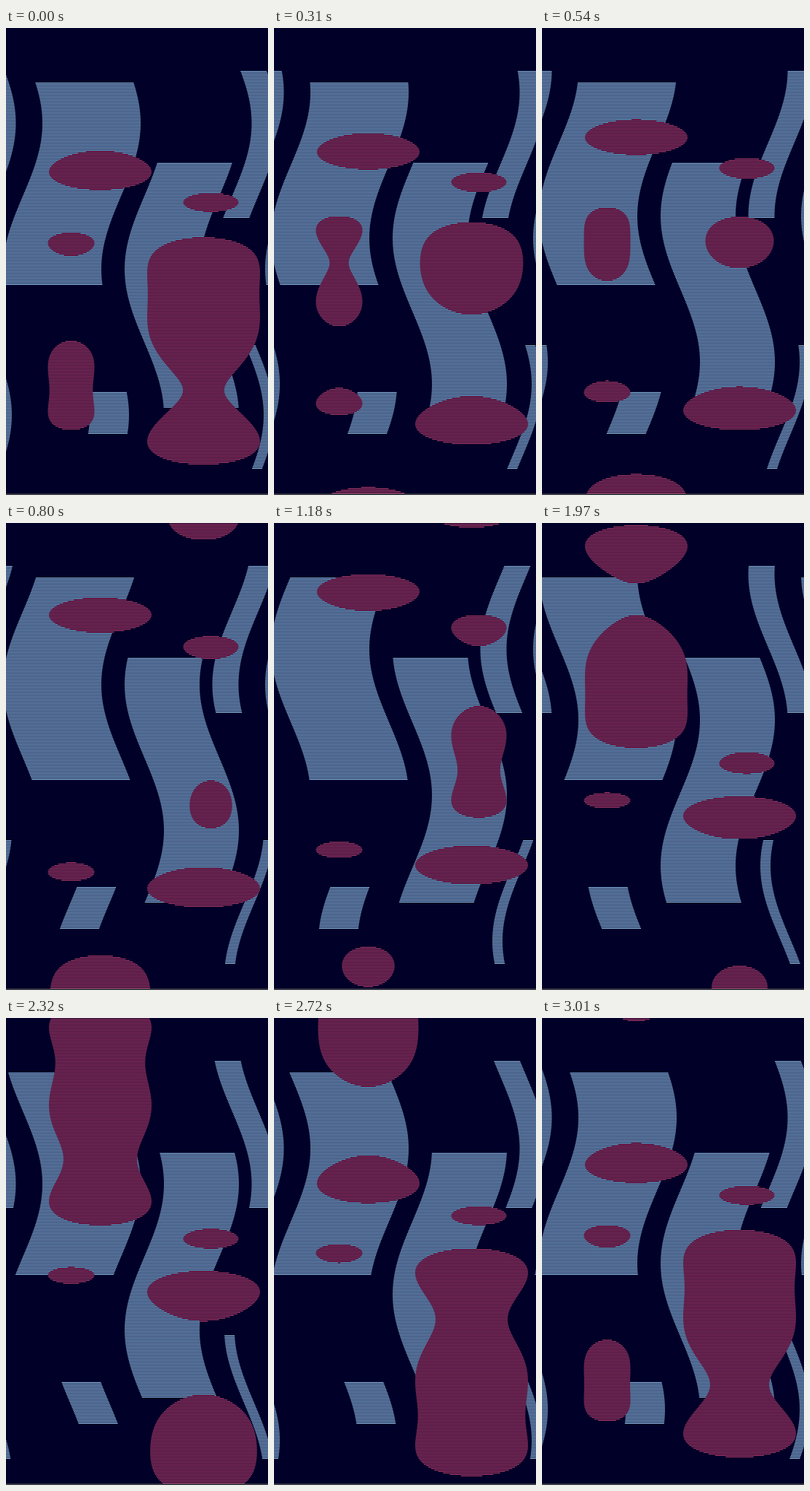
These frames come from a looping animation (360 by 640 pixels, 3.06 s). An HTML page with a canvas:

```html
<!DOCTYPE html>
<html lang="en">
<head>
<meta charset="utf-8">
<title>Scanline waves</title>
<style>
html, body { margin: 0; width: 100%; height: 100%; overflow: hidden; background: #000028; }
canvas { display: block; width: 360px; height: 640px; }
</style>
</head>
<body>
<canvas id="stage" width="360" height="640"></canvas>
<script>
const ctx = document.getElementById('stage').getContext('2d');
const WIDTH = 360, HEIGHT = 640, BOTTOM = 638;
const LOOP = 3060, STEPS = 66;
const WAVE = 400, PEAK = 130, SWAY = 27, LIFT = 125;

const bands = [
  { x: 23, w: 135, top: 75, end: 353 },
  { x: 190, w: 103, top: 184, end: 521 },
  { x: 310.5, w: 36, top: 59, end: 260 },
  { x: 327, w: 14, top: 435, end: 604 },
  { x: 88, w: 54, top: 499, end: 556 }
];

const discs = [
  { x: 129.5, y: 134.5, r: 70.5 },
  { x: 89.5, y: 400, r: 32 },
  { x: 281.5, y: 255, r: 38 },
  { x: 271.5, y: 460.5, r: 77.5 }
];

// The wave climbs in even steps, at a slightly uneven pace
function stepAt(t) {
  const turn = t / LOOP;
  const drift = 0.6 + 0.35 * Math.sin(2 * Math.PI * (turn - 1 / 8));
  return Math.floor(turn * STEPS + drift);
}

function drawBands(y, c) {
  ctx.fillStyle = '#a0d4fc';
  for (const b of bands) {
    if (y < b.top || y >= b.end) continue;
    const x = b.x + SWAY * c;
    for (const dx of [-WIDTH, 0, WIDTH]) ctx.fillRect(x + dx, y, b.w, 1);
  }
}

// Each row of a disc is taken from where the wave has lifted it
function drawDiscs(y, c) {
  ctx.fillStyle = '#c44270';
  const row = y - LIFT * c;
  for (const d of discs) {
    for (const dy of [-HEIGHT, 0, HEIGHT]) {
      const v = row - d.y - dy;
      if (Math.abs(v) >= d.r) continue;
      const half = Math.sqrt(d.r * d.r - v * v);
      ctx.fillRect(d.x - half, y, 2 * half, 1);
    }
  }
}

function draw(t) {
  const peak = PEAK - stepAt(t) * WAVE / STEPS;
  ctx.fillStyle = '#000028';
  ctx.fillRect(0, 0, WIDTH, HEIGHT);
  for (let y = 1; y < BOTTOM; y += 2) {
    const c = Math.cos(2 * Math.PI * (y - peak) / WAVE);
    drawBands(y, c);
    drawDiscs(y, c);
  }
  ctx.fillStyle = '#3a3a46';
  ctx.fillRect(0, BOTTOM, WIDTH, HEIGHT - BOTTOM);
}

const start = performance.now();
function tick() {
  draw((performance.now() - start) % LOOP);
  requestAnimationFrame(tick);
}
tick();
</script>
</body>
</html>
```
